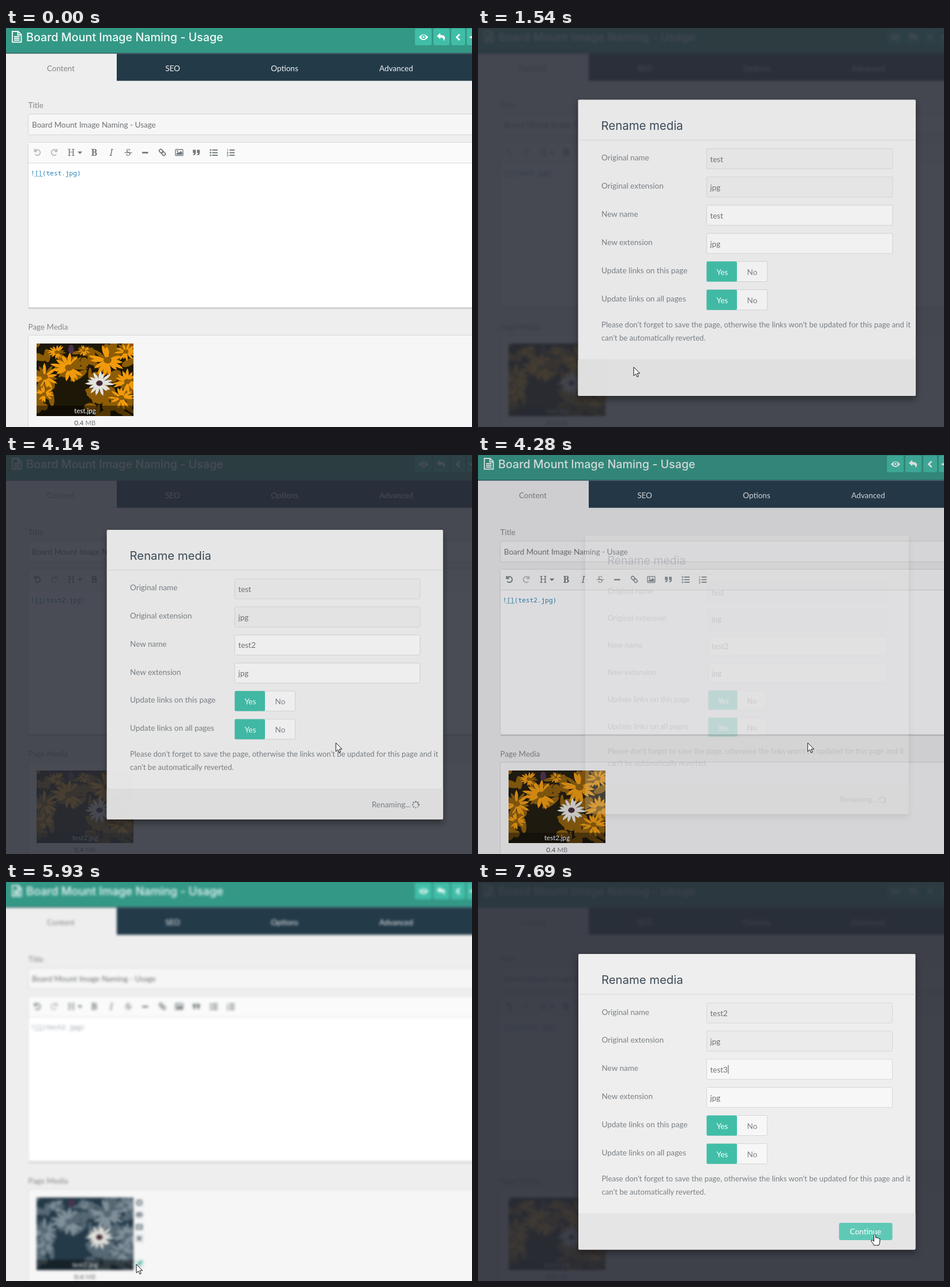
Animation of 808x693 px, one loop 8 s. Source, as an HTML page:

```html
<!DOCTYPE html>
<html lang="en">
<head>
<meta charset="utf-8">
<title>Renaming a media file</title>
<style>
html, body { margin: 0; width: 100%; height: 100%; overflow: hidden; background: #eee; }
svg { display: block; width: 808px; height: 693px; --dark: #1d1707; --mid: #8d5c06; --petal: #f09a0c; --code: #2680b3; }
svg.slate { --dark: #243a49; --mid: #566873; --petal: #81909a; --code: #8b979d; }
text { font: 13.5px Lato, "Open Sans", sans-serif; fill: #7b8186; white-space: pre; }
.head { font: 500 19.7px Inter, sans-serif; fill: #f2faf8; }
.tab { fill: #f0f3f4; text-anchor: middle; }
.label { fill: #868686; }
.note { font-size: 13.15px; }
.code { font: 11.1px "Noto Sans Mono", "Liberation Mono", monospace; fill: var(--code); }
.serif { font: 700 16px "Noto Serif", "Liberation Serif", serif; fill: #737b7f; text-anchor: middle; }
.small { font-size: 11.6px; text-anchor: middle; }
.dlg { font: 400 20.3px Inter, sans-serif; fill: #3c4b57; }
.white { fill: #fff; }
.mid { text-anchor: middle; }
.box { fill: #f6f6f6; stroke: #d6d6d6; }
.line { fill: none; stroke: #737b7f; stroke-width: 1.8; }
.btn { fill: #41bea8; }
.fill { fill: #737b7f; }
</style>
</head>
<body>
<svg id="stage" viewBox="0 0 808 693" xmlns="http://www.w3.org/2000/svg">
  <g id="page">
    <rect x="-20" y="-20" width="850" height="740" fill="#eee"/>
    <rect x="-20" y="-20" width="850" height="63" fill="#349886"/>
    <rect x="-20" y="43" width="850" height="1.500" fill="#2b5b5f"/>
    <rect x="192" y="44.500" width="640" height="47.200" fill="#233a49"/>
    <g fill="none" stroke="#f2faf8" stroke-width="1.900">
      <path d="M11 6H21L26.500 11.500V24.500H11ZM20.500 6V12H26.500M14 15H23.500M14 18H23.500M14 21H23.500"/>
    </g>
    <text class="head" x="35" y="22.500">Board Mount Image Naming - Usage</text>
    <g class="btn">
      <rect x="709" y="1" width="29" height="29" rx="3"/>
      <rect x="741" y="1" width="28" height="29" rx="3"/>
      <rect x="772" y="1" width="24" height="29" rx="3"/>
      <rect x="799" y="1" width="28" height="29" rx="3"/>
    </g>
    <path class="white" d="M716 16Q724 6 732 16Q724 26 716 16Z"/>
    <circle cx="724" cy="15.500" r="3.600" fill="#41bea8"/>
    <circle class="white" cx="724" cy="15.500" r="1.800"/>
    <path class="white" d="M747 14L753 8.500V12Q762 12 761 18Q760.500 21 758.500 22.500Q759.500 16.500 753 16.500V19.500Z"/>
    <path d="M786.500 11L781.500 16L786.500 21M804 16H812" fill="none" stroke="#fff" stroke-width="2.800"/>
    <text class="tab" x="95" y="74.500" style="fill:#868686">Content</text>
    <text class="tab" x="289" y="74.500">SEO</text>
    <text class="tab" x="483" y="74.500">Options</text>
    <text class="tab" x="676.500" y="74.500">Advanced</text>

    <text class="label" x="38.500" y="139">Title</text>
    <rect class="box" x="38.500" y="149.500" width="800" height="36" rx="3"/>
    <text x="45" y="173" style="fill:#6f7275">Board Mount Image Naming - Usage</text>

    <rect x="39" y="484" width="800" height="4" fill="#cfcfcf"/>
    <rect x="38.500" y="198.500" width="800" height="287" rx="3" fill="#fff" stroke="#d6d6d6"/>
    <path d="M39 199H830V234H39Z" fill="#fafafa"/>
    <path d="M39 234.500H830" stroke="#dcdcdc"/>
    <path id="undo" class="line" d="M50.500 213A5 5 0 1 1 50.500 219.500M49.500 210V214.500H54"/>
    <path class="line" opacity=".5" d="M87.500 213A5 5 0 1 0 87.500 219.500M88.500 210V214.500H84"/>
    <text class="serif" x="113" y="222" style="font-weight:500">H</text>
    <path class="fill" d="M124 214.500H132.500L128.200 219Z"/>
    <text class="serif" x="153" y="222">B</text>
    <text class="serif" x="182.500" y="222" style="font-style:italic;font-weight:500">I</text>
    <text class="serif" x="212" y="222" style="font-weight:500">S</text>
    <path class="line" d="M205.500 216.500H218.500" style="stroke-width:1.200"/>
    <path class="line" d="M236 216.500H246.500" style="stroke-width:2.800"/>
    <g class="line" transform="rotate(45 271 216)" style="stroke-width:1.700">
      <rect x="264.500" y="213.500" width="7" height="5" rx="2.500"/>
      <rect x="270.500" y="213.500" width="7" height="5" rx="2.500"/>
    </g>
    <rect class="line" x="293.800" y="211" width="13" height="10.500" rx="1" style="stroke-width:1.400"/>
    <path class="fill" d="M295.500 220V218L298.500 215L300 216.500L303 213.500L305.500 216V220Z"/>
    <circle class="fill" cx="297.300" cy="213.800" r="1.300"/>
    <g class="fill">
      <path id="quote" d="M324 211.500H329V217Q329 221 324.500 221V219Q326.500 219 326.500 217H324Z"/>
      <use href="#quote" x="7"/>
    </g>
    <path class="line" d="M357.500 212H367M357.500 216.500H367M357.500 221H367M387.500 212H396.500M387.500 216.500H396.500M387.500 221H396.500"/>
    <path class="line" d="M353.500 212H356M353.500 216.500H356M353.500 221H356" style="stroke-width:2.400"/>
    <path class="line" d="M384.200 210V213.500M383 215.500H385.200L383.200 218H385.500M383 220H385V222.500H383" style="stroke-width:1"/>
    <text class="code" x="43" y="256">!<tspan text-decoration="underline">[]</tspan><tspan id="link"></tspan></text>

    <text class="label" x="38.500" y="523.500">Page Media</text>
    <rect class="box" x="38.500" y="533.500" width="800" height="200" rx="3"/>
    <clipPath id="frame"><rect x="53" y="548" width="168" height="126"/></clipPath>
    <g clip-path="url(#frame)">
      <g id="photo"></g>
      <rect x="53" y="656" width="168" height="18" fill="#000" opacity=".42"/>
    </g>
    <text class="small white" id="caption" x="137" y="669"></text>
    <text class="small" x="137" y="689.500" style="font-size:11.400px"><tspan fill="#505050">0.4</tspan> MB</text>
    <g id="tools">
      <path fill="#e2e5e6" d="M224 550H239V564H224ZM224 571H239V585H224ZM224 592H239V606H224ZM224 612H239V626H224ZM224 656H239V670H224Z"/>
      <g class="line" style="stroke:#4a5a64">
        <circle cx="231" cy="557" r="4"/>
        <path d="M226 578Q231 572 236 578Q231 584 226 578ZM230 578H232"/>
        <rect x="226.500" y="596" width="9" height="6.500"/>
        <path d="M227.500 615.500L234.500 622.500M234.500 615.500L227.500 622.500"/>
      </g>
      <path id="pencil" d="M227 667L228 663L234 657L237 660L231 666Z"/>
    </g>
  </g>

  <rect id="shade" width="808" height="693" fill="#2b2e38"/>
  <g id="modal">
    <rect id="panel" x="174" y="125" width="584.500" rx="2" fill="#eee" style="filter:drop-shadow(0 6px 6px rgba(0,0,0,.4))"/>
    <path d="M174 195H758.500" stroke="#dedede" stroke-width="1.500"/>
    <rect id="foot" x="174" y="575" width="584.500" rx="2" fill="#e5e5e5"/>
    <text class="dlg" x="214" y="177">Rename media</text>
    <g id="rows"></g>
    <path id="caret" stroke="#555" d="M0 318V333"/>
    <text class="note" x="214.500" y="520">Please don't forget to save the page, otherwise the links won't be updated for this page and it</text>
    <text class="note" x="214.500" y="542.500">can't be automatically reverted.</text>
    <g id="go">
      <rect id="goBox" x="626" y="592" width="92.500" height="30" rx="3"/>
      <text class="white mid" x="672" y="612">Continue</text>
    </g>
    <g id="busy">
      <text x="702.500" y="608" text-anchor="end">Renaming...</text>
      <g id="spin"></g>
    </g>
  </g>
  <path id="arrow" d="M0 0V15L3.500 11.800L6 17L8.300 16L5.900 10.900H10.700Z" fill="#fff" stroke="#111" stroke-linejoin="round"/>
  <path id="hand" d="M-1.500 1Q0 -1.500 1.500 1V6Q3 4.800 4 6.300Q5.500 5.200 6.500 7Q8.500 6.300 8.800 8.500V13Q8.500 16 7 19H-1.500Q-3 15.500 -6 12Q-6.800 9.500 -4.500 10L-1.500 12Z" fill="#fff" stroke="#111" stroke-linejoin="round"/>
</svg>
<script>
const $ = id => document.getElementById(id);
const LOOP = 8000;
const clamp = v => Math.min(1, Math.max(0, v));
const easeOut = v => 1 - Math.pow(1 - clamp(v), 2.3);
const smooth = v => v * v * (3 - 2 * v);
const show = (id, on) => { $(id).style.display = on ? '' : 'none'; };
const opacity = (id, v) => $(id).setAttribute('opacity', v);

// Flat flower picture
let seed = 11;
const rnd = () => (seed = seed * 16807 % 2147483647) / 2147483647;

// Pointed petals; a share of them lies in shadow
function daisy(x, y, r, petals, fill, shaded, core) {
  let out = '';
  for (let i = 0; i < petals; i++) {
    const len = r * (0.8 + rnd() * 0.3), w = r * 0.22;
    out += `<path d="M0 0Q${len * 0.6} ${-w} ${len} 0Q${len * 0.6} ${w} 0 0Z"
      fill="${rnd() < shaded ? 'var(--mid)' : fill}"
      transform="translate(${x} ${y}) scale(1 .85) rotate(${i * 360 / petals + rnd() * 14})"/>`;
  }
  return out + `<ellipse cx="${x}" cy="${y}" rx="${r * 0.22}" ry="${r * 0.18}" fill="${core}"/>`;
}

function blotches(count, x, y, w, h, fill) {
  let out = '';
  for (let i = 0; i < count; i++) {
    const cx = x + rnd() * w, cy = y + rnd() * h;
    out += `<ellipse cx="${cx}" cy="${cy}" rx="${5 + rnd() * 12}" ry="${3 + rnd() * 6}"
      fill="${fill}" transform="rotate(${rnd() * 180} ${cx} ${cy})"/>`;
  }
  return out;
}

function photo() {
  let out = '<rect x="53" y="548" width="168" height="126" fill="var(--dark)"/>'
    + blotches(30, 53, 548, 168, 60, 'var(--mid)')
    + blotches(26, 145, 600, 76, 74, 'var(--mid)')
    + blotches(8, 53, 600, 35, 74, 'var(--mid)')
    + '<ellipse cx="113" cy="558" rx="5" ry="8" fill="#4b304c"/>';
  const blooms = [[109, 590, 31], [176, 577, 32], [67, 606, 27], [210, 614, 25], [88, 563, 16],
    [208, 562, 20], [200, 642, 23], [66, 636, 18], [135, 560, 12]];
  for (const [x, y, r] of blooms) out += daisy(x, y, r, 15, 'var(--petal)', 0.25, 'var(--mid)');
  return out + '<ellipse cx="116" cy="637" rx="24" ry="17" fill="var(--dark)"/>'
    + daisy(162, 617, 26, 15, '#e4e3dd', 0, '#432834');
}

// Dialog rows
function rows() {
  let out = '';
  const fields = ['Original name', 'Original extension', 'New name', 'New extension'];
  fields.forEach((name, i) => {
    const y = 210 + i * 48.9;
    out += `<text x="214.500" y="${y + 20.5}">${name}</text>
      <rect x="396.500" y="${y}" width="322" height="35" rx="2" fill="${i < 2 ? '#ebebeb' : '#f7f7f7'}" stroke="#d6d6d6"/>
      <text id="field${i}" x="402.500" y="${y + 23}" style="fill:#6f7275">jpg</text>`;
  });
  ['this page', 'all pages'].forEach((name, i) => {
    const y = 405.5 + i * 49;
    out += `<text x="214.500" y="${y + 20.5}">Update links on ${name}</text>
      <rect x="396.500" y="${y}" width="105" height="35" rx="2" fill="#f7f7f7" stroke="#d6d6d6"/>
      <rect class="btn" x="396.500" y="${y}" width="52.500" height="35" rx="2"/>
      <text class="white mid" x="423.500" y="${y + 23.5}">Yes</text>
      <text class="mid" x="475.500" y="${y + 23.5}">No</text>`;
  });
  return out;
}

$('photo').innerHTML = photo();
$('rows').innerHTML = rows();
$('spin').innerHTML = Array.from({ length: 8 }, (_, i) =>
  `<circle cx="5.200" r="${1 + i * 0.1}" fill="#7b8186" transform="rotate(${i * 45})"/>`).join('');

// Pointer stops: time, x, y
const path = [
  [65, 438, 610], [650, 140, 655], [880, 140, 655], [1240, 188, 659], [1390, 226, 664],
  [1540, 270, 589], [2120, 455, 336], [2800, 455, 336], [3400, 688, 612], [3620, 688, 612],
  [4100, 572, 500], [4680, 571, 500], [5480, 226, 664], [5930, 226, 664], [6150, 388, 487],
  [6510, 455, 338], [6670, 461, 345], [7110, 461, 345], [7690, 688, 612], [8000, 688, 612]
];

function pointer(t) {
  const i = path.findIndex(k => k[0] > t);
  if (i < 1) return path[0].slice(1);
  const [t0, x0, y0] = path[i - 1], [t1, x1, y1] = path[i];
  const v = smooth((t - t0) / (t1 - t0));
  return [x0 + (x1 - x0) * v, y0 + (y1 - y0) * v];
}

function newName(t) {
  if (t < 2580) return 'test';
  if (t < 6970) return 'test2';
  return t < 7110 ? 'test' : 'test3';
}

function dialog(t) {
  if (t < 4135) {
    const p = easeOut((t - 1390) / 195);
    return { p, scale: 1.05 - 0.05 * p, blur: t >= 1390 };
  }
  if (t < 5500) {
    const p = 1 - easeOut((t - 4135) / 280);
    return { p, scale: 0.95 + 0.05 * p, blur: false };
  }
  const p = easeOut((t - 5960) / 240);
  return { p, scale: 1.05 - 0.05 * p, blur: t >= 5925 };
}

function draw(t) {
  const { p, scale, blur } = dialog(t);
  const [x, y] = pointer(t);
  const busy = t >= 3540 && t < 4500;
  const file = (t < 3620 ? 'test' : 'test2') + '.jpg';

  $('stage').classList.toggle('slate', t >= 5925 && t < 6010);
  $('page').style.filter = blur ? 'blur(1.9px)' : 'none';
  $('link').textContent = `(${file})`;
  $('caption').textContent = file;
  opacity('undo', t < 3620 ? 0.5 : 1);
  const over = t >= 65 && p < 0.5 && x > 45 && x < 240 && y > 548;
  show('tools', over);
  $('pencil').setAttribute('fill', x > 214 ? '#41bea8' : '#4a5a64');

  opacity('shade', 0.9 * p);
  opacity('modal', p);
  show('modal', p > 0);
  $('modal').setAttribute('transform',
    `translate(466.25 ${381.75 + (busy ? 4.5 : 0)}) scale(${scale}) translate(-466.25 -381.75)`);
  $('panel').setAttribute('height', busy ? 504 : 513.5);
  $('foot').setAttribute('height', busy ? 54 : 63.5);
  $('field0').textContent = t < 4500 ? 'test' : 'test2';
  $('field2').textContent = newName(t);

  show('caret', (t >= 2200 && t < 3400) || t >= 6810);
  const end = 403.5 + $('field2').getComputedTextLength();
  $('caret').setAttribute('transform', `translate(${end} 0)`);

  show('go', !busy);
  opacity('go', t < 4500 ? clamp((t - 2570) / 90) : clamp((t - 7100) / 90));
  const onGo = p > 0.9 && !busy && x > 626 && x < 719 && y > 592;
  $('goBox').setAttribute('fill', onGo ? '#5fc9b6' : '#41bea8');
  show('busy', busy);
  $('spin').setAttribute('transform', `translate(711 603.5) rotate(${Math.floor(t / 125) * 45})`);

  const hidden = t < 65 || (t >= 2120 && t < 2800) || (t >= 6810 && t < 7110);
  show('arrow', !hidden && !onGo);
  show('hand', !hidden && onGo);
  for (const id of ['arrow', 'hand']) $(id).setAttribute('transform', `translate(${x} ${y})`);
}

const start = performance.now();
function tick() {
  draw((performance.now() - start) % LOOP);
  requestAnimationFrame(tick);
}
tick();
</script>
</body>
</html>
```
